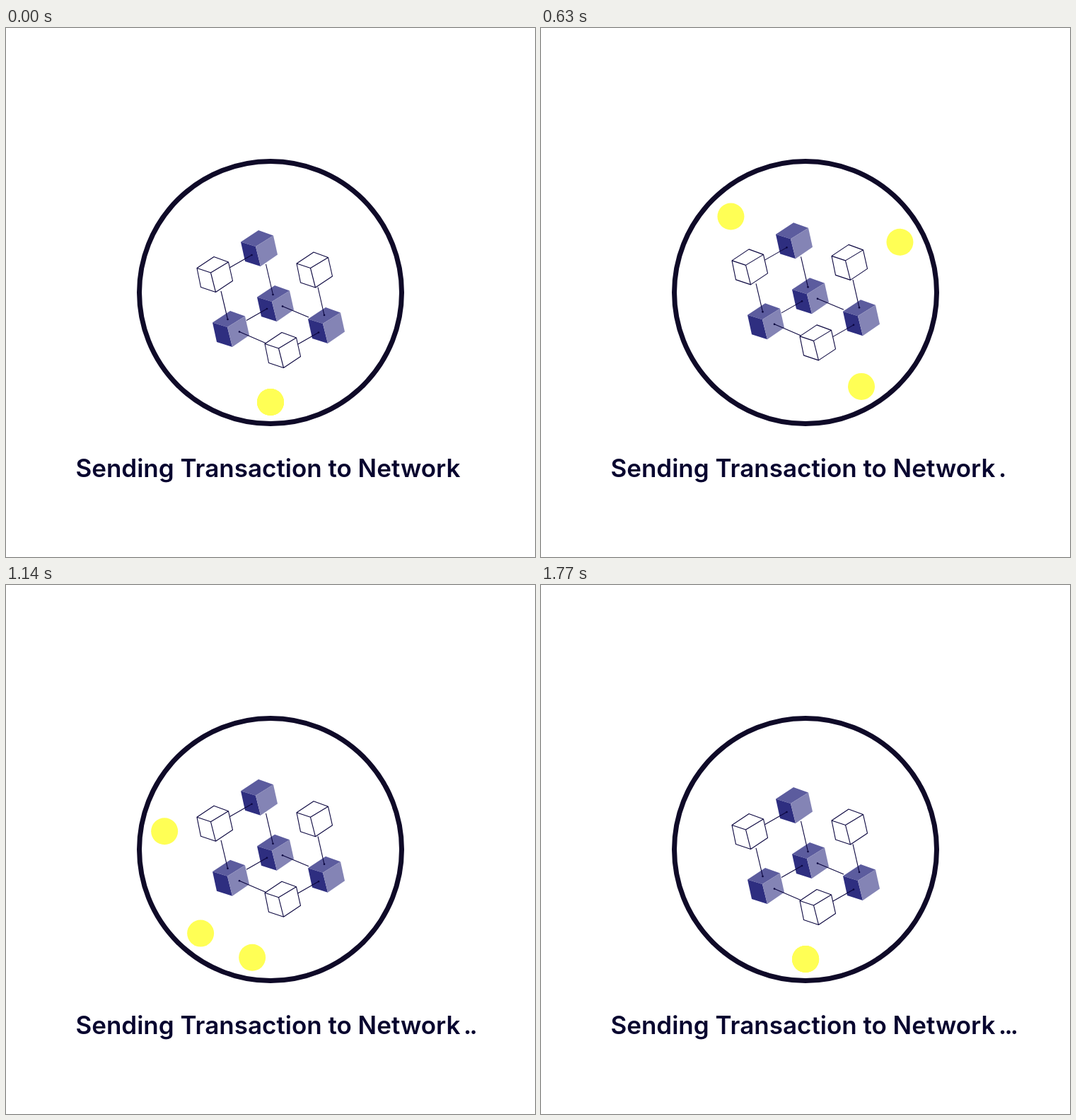
Recreate the animation shown at these times as an HTML page. Size 748 px wide and 748 px high, loop 1800 ms.

```html
<!DOCTYPE html>
<html lang="en">
<head>
<meta charset="utf-8">
<title>Sending Transaction</title>
<style>
  html, body { margin: 0; width: 100%; height: 100%; overflow: hidden; background: #fff; }
  svg { display: block; width: 100vw; height: 100vh; }
  text { font: 600 35px Inter, "Open Sans", sans-serif; fill: #08052f; }
  .line { fill: none; stroke: #0c0740; stroke-width: 1.1; stroke-linejoin: round; }
  .tip { fill: #0c0740; }
  .ball { fill: #ffff55; }
</style>
</head>
<body>
<svg viewBox="0 0 748 748">
  <defs>
    <g id="solid">
      <path fill="#5c5c9e" d="M-1-25.5 20-18-5-2.5-26-9Z"/>
      <path fill="#2e2e80" d="M-26-9-5-2.5 2 25.5-20 18.5Z"/>
      <path fill="#8484b5" d="M-5-2.5 20-18 26 9 2 25.5Z"/>
    </g>
    <path id="wire" class="line" d="M-25-9-1-25 19.5-17.5 25.5 9 1.5 25-19.5 18ZL-5.5-2.5 1.5 25M-5.5-2.5 19.5-17.5"/>
  </defs>
  <circle cx="374" cy="374" r="185.5" fill="none" stroke="#0f0a28" stroke-width="7"/>
  <g id="network"></g>
  <g id="balls"></g>
  <text x="98.5" y="635">Sending Transaction to Network</text>
  <text id="dots" x="647 655.4 663.8" y="635"></text>
</svg>
<script>
const LOOP = 1800, STEP = 30, STAGGER = 210;
const $ = id => document.getElementById(id);

function add(parent, tag, attrs) {
  const el = document.createElementNS("http://www.w3.org/2000/svg", tag);
  for (const k in attrs) el.setAttribute(k, attrs[k]);
  return parent.appendChild(el);
}

const net = $("network");
const cubes = {
  solid: [[358, 311.5], [381, 389.5], [318, 425.5], [453, 420.5]],
  wire: [[295, 348.5], [436, 342], [391, 455.5]]
};
for (const kind in cubes)
  for (const [x, y] of cubes[kind]) add(net, "use", { href: "#" + kind, x, y });

// Each link ends in a small tip at its first point.
const links = [
  [347.5, 321, 316, 339], [377.5, 377, 367.5, 334], [313.5, 412, 304, 372],
  [369, 397, 340, 413.5], [391, 393.5, 428, 409], [450, 406, 441, 366.5],
  [330, 429.5, 367, 445.5], [442, 430.5, 413, 447]
];
for (const [x1, y1, x2, y2] of links) {
  add(net, "line", { class: "line", x1, y1, x2, y2 });
  add(net, "circle", { class: "tip", cx: x1, cy: y1, r: 1.3 });
}

const balls = [0, 1, 2].map(() => add($("balls"), "circle", { class: "ball", r: 19 }));

// Time in ms and angle in degrees along one eased turn.
const turn = [
  [0, 0], [60, 2.2], [240, 39.3], [360, 88.9], [480, 150.7], [570, 198.4],
  [780, 281.5], [870, 306.6], [1020, 336.9], [1080, 345.6], [1290, 359.2], [1380, 360]
];
const last = turn.length - 1;

function slope(i) {
  if (i === 0 || i === last) return 0;
  const [a, b] = [turn[i - 1], turn[i + 1]];
  return (b[1] - a[1]) / (b[0] - a[0]);
}

function angle(t) {
  if (t <= 0) return 0;
  if (t >= turn[last][0]) return 360;
  const i = turn.findIndex(p => p[0] > t) - 1;
  const [t0, a0] = turn[i], [t1, a1] = turn[i + 1];
  const h = t1 - t0, s = (t - t0) / h, r = 1 - s;
  return a0 * r * r * (1 + 2 * s) + a1 * s * s * (1 + 2 * r)
    + h * s * r * (r * slope(i) - s * slope(i + 1));
}

function draw(now) {
  const t = Math.floor(now % LOOP / STEP) * STEP;
  const lift = 6.7 * (1 - Math.cos(2 * Math.PI * t / LOOP));
  net.setAttribute("transform", `translate(0 ${-lift})`);
  balls.forEach((ball, i) => {
    const a = angle(t - i * STAGGER) * Math.PI / 180;
    ball.setAttribute("cx", 374 + 152.5 * Math.sin(a));
    ball.setAttribute("cy", 376.5 + 152.5 * Math.cos(a));
  });
  $("dots").textContent = ".".repeat(Math.floor(t / 450));
}

let start;
function tick(now) {
  start ??= now;
  draw(now - start);
  requestAnimationFrame(tick);
}
draw(0);
requestAnimationFrame(tick);
</script>
</body>
</html>
```
